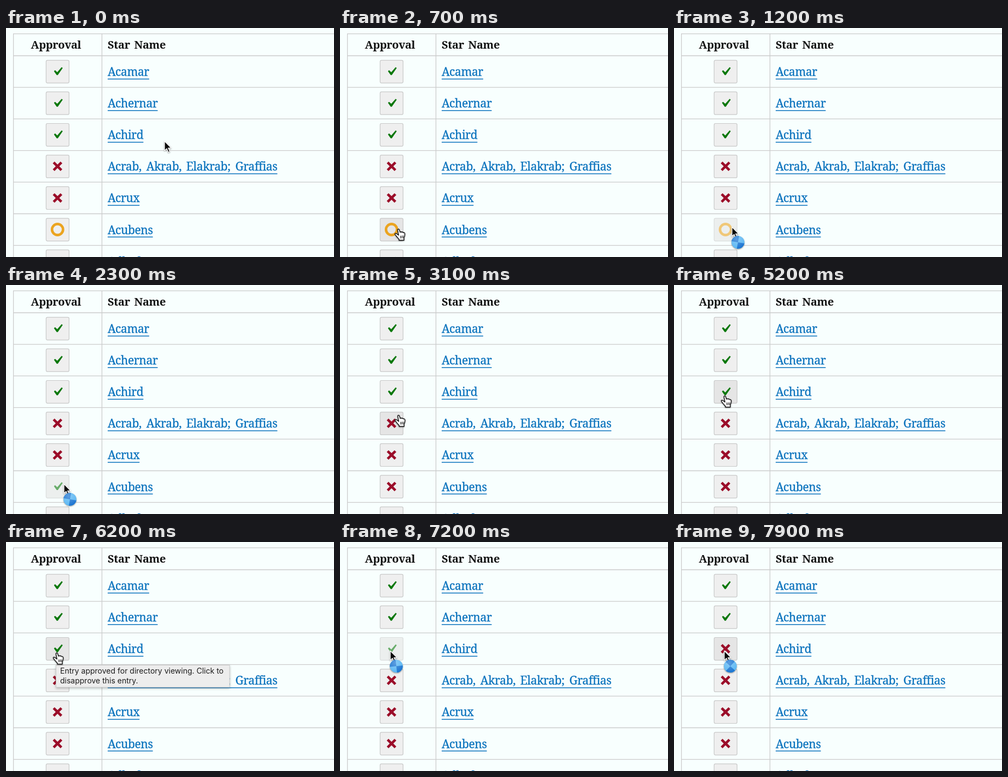
Recreate the animation shown at these times as an HTML page. Size 600 by 421 pixels, loop 8 s.

```html
<!DOCTYPE html>
<html lang="en">
<head>
<meta charset="utf-8">
<title>Star approval table</title>
<style>
  html, body { margin: 0; width: 100%; height: 100%; overflow: hidden; background: #f8fffe; }
  svg { display: block; width: 600px; height: 421px; }
  .grid { stroke: #ccc; stroke-width: 1.3; fill: none; }
  .head, .name { font-family: "Noto Serif", serif; letter-spacing: -.37px; }
  .head { font-size: 20px; font-weight: 700; fill: #111; word-spacing: 3px; }
  .name { font-size: 21px; fill: #0a72bd; stroke: #0a72bd; stroke-width: .3; word-spacing: 3.7px; }
  .rule { stroke: #0a72bd; stroke-width: 1.5; }
  .box { fill: #efefef; stroke: #c9c9c9; stroke-width: 1.2; }
  .hover .box { fill: #e5e5e5; }
  .busy { opacity: .6; }
  .tip text { font: 14px Inter, "Liberation Sans", sans-serif; fill: #1c1c1c; }
  .tip { filter: drop-shadow(0 2px 2px rgba(0, 0, 0, .25)); }
  #cursor { filter: drop-shadow(0 1.2px 1px rgba(0, 0, 0, .4)); }
</style>
</head>
<body>
<svg viewBox="0 0 600 421">
  <defs>
    <path id="yes" fill="#0b780b" d="M14.83 4.89l1.34.94-5.81 8.38H9.02L5.78 9.67l1.34-1.25 2.57 2.4z"/>
    <path id="no" fill="#9b0d29" d="M12.12 10l3.53 3.53-2.12 2.12L10 12.12l-3.54 3.54-2.12-2.12L7.88 10 4.34 6.46l2.12-2.12L10 7.88l3.54-3.53 2.12 2.12z"/>
    <circle id="open" cx="10" cy="10" r="6.5" fill="none" stroke="#eba420" stroke-width="3"/>
    <radialGradient id="gloss" cx=".4" cy=".25" r=".8">
      <stop offset="0" stop-color="#fff" stop-opacity=".3"/>
      <stop offset="1" stop-color="#fff" stop-opacity="0"/>
    </radialGradient>
  </defs>
  <g id="table">
    <path class="grid" id="lines"/>
    <text class="head" x="45.5" y="38">Approval</text>
    <text class="head" x="186" y="38">Star Name</text>
  </g>
  <g class="tip" id="tip">
    <rect x="91.5" y="226.5" width="317.5" height="40.5" fill="#ededed" stroke="#c6c6c6" stroke-width=".8"/>
    <text x="99" y="242.3">Entry approved for directory viewing. Click to</text>
    <text x="99" y="260.2">disapprove this entry.</text>
  </g>
  <g id="cursor">
    <path id="arrow" fill="#0a0a0a" stroke="#fff" stroke-width="1.3" stroke-linejoin="round"
      d="M0 0V17.4L4 13.7L6.9 20.5L9.7 19.3L6.8 12.6H12.2Z"/>
    <g id="hand" fill="#fff" stroke="#111" stroke-width="1.4" stroke-linejoin="round" stroke-linecap="round">
      <path d="M-.6 5.7C-1 4 1.8 3.2 2.4 5L4 10C4 8.6 6.4 8.4 6.9 10C7.4 8.9 9.2 9 9.7 10.8C10.4 9.9 12.4 10.4 12.6 12.6C12.9 15.5 12.4 17.5 11 20V24.5H2V22.8C.5 21-1.6 18.8-3 16.8C-5 14.6-6 13.4-5.4 12.4C-4.4 11-2.6 12.2 1.2 15.2Z"/>
      <path stroke-width="1.1" d="M4.6 16.5l.3 4M7.2 16.3l.1 4M9.7 16.2v4"/>
    </g>
    <g id="ball" transform="translate(11 28.3)">
      <g id="wheel">
        <circle r="11.8" fill="#58b6f3"/>
        <path fill="#1673d1" d="M0 0V-11.8A11.8 11.8 0 0 1 11.8 0ZM0 0V11.8A11.8 11.8 0 0 1-11.8 0Z"/>
      </g>
      <circle r="11.8" fill="url(#gloss)"/>
    </g>
  </g>
</svg>
<script>
const LOOP = 8000, STEP = 100, PITCH = 58.1, FIRST = 80, TURN = 1100;
const rows = [
  ['Acamar', 'yes'], ['Achernar', 'yes'], ['Achird', 'yes'],
  ['Acrab, Akrab, Elakrab; Graffias', 'no'], ['Acrux', 'no'],
  ['Acubens', 'open'], ['Adhafera', 'yes']
];
// pointer stops: time, x, y
const path = [
  [0, 290, 208], [600, 106, 365.7], [2700, 106, 365.7],
  [3100, 106.2, 235.5], [3300, 106.2, 235.5], [3700, 92, 200], [LOOP, 92, 200]
];
// each click: row, pressed, answered, pointer free again, new icon
const clicks = [
  [5, 800, 1500, 1600, 'yes'],
  [5, 2000, 2500, 2600, 'no'],
  [2, 7200, 7800, 8000, 'no']
];
const tipSpan = [5600, 7200];

const $ = id => document.getElementById(id);
const add = (parent, tag, attrs, text) => {
  const el = document.createElementNS('http://www.w3.org/2000/svg', tag);
  for (const k in attrs) el.setAttribute(k, attrs[k]);
  if (text) el.textContent = text;
  return parent.appendChild(el);
};
const show = (id, on) => $(id).setAttribute('visibility', on ? 'visible' : 'hidden');
const within = (t, from, to) => t >= from && t < to;

let lines = 'M13.6 10.5V421M175.5 10.5V421M13 10.7H600';
const buttons = rows.map(([name], i) => {
  const y = FIRST + i * PITCH;
  lines += `M13 ${y - 29}H600`;
  const label = add($('table'), 'text', { class: 'name', x: 186, y: y + 8 }, name);
  const end = 186 + label.getComputedTextLength();
  add($('table'), 'line', { class: 'rule', x1: 186, x2: end, y1: y + 13.7, y2: y + 13.7 });
  const group = add($('table'), 'g', { transform: `translate(94.4 ${y})` });
  add(group, 'rect', { class: 'box', x: -21, y: -20.7, width: 42, height: 41.8, rx: 2.5 });
  const icon = add(group, 'use', { transform: 'scale(1.55) translate(-10.1 -10)' });
  return { group, icon, y };
});
$('lines').setAttribute('d', lines);

function pointer(t) {
  const i = path.findIndex((p, n) => n && t < p[0]);
  const [t0, x0, y0] = path[i - 1], [t1, x1, y1] = path[i];
  const u = (t - t0) / (t1 - t0), e = u * u * (3 - 2 * u);
  return [x0 + (x1 - x0) * e, y0 + (y1 - y0) * e];
}

function draw(t) {
  const [x, y] = pointer(t);
  const waiting = clicks.some(c => within(t, c[1], c[3]));
  let over = false;
  buttons.forEach((b, i) => {
    const mine = clicks.filter(c => c[0] === i);
    const done = mine.filter(c => t >= c[2]).pop();
    const busy = mine.some(c => within(t, c[1], c[2]));
    const hover = Math.abs(x - 94.4) < 21.5 && Math.abs(y - b.y) < 21.5;
    over = over || hover;
    b.icon.setAttribute('href', '#' + (done ? done[4] : rows[i][1]));
    b.group.setAttribute('class', (hover ? 'hover ' : '') + (busy ? 'busy' : ''));
  });
  $('cursor').setAttribute('transform', `translate(${x} ${y})`);
  $('wheel').setAttribute('transform', `rotate(${100 + (t - 1200) / TURN * 360})`);
  show('arrow', waiting || !over);
  show('hand', over && !waiting);
  show('ball', waiting);
  show('tip', within(t, ...tipSpan));
}

const start = performance.now();
function tick() {
  const t = (performance.now() - start) % LOOP;
  draw(Math.floor(t / STEP) * STEP);
  requestAnimationFrame(tick);
}
tick();
</script>
</body>
</html>
```
